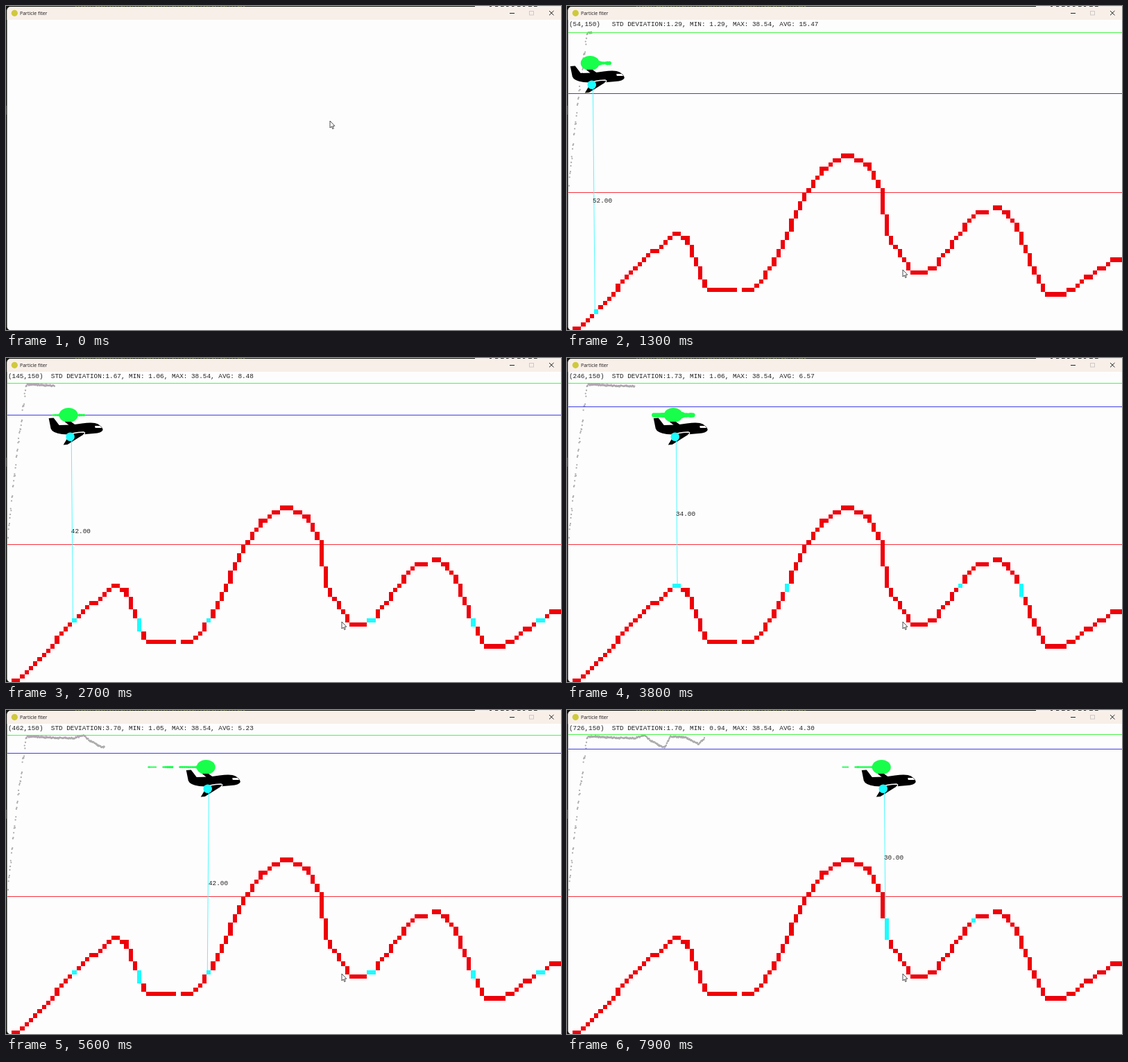
These frames come from a looping animation (800 px wide and 468 px high, 8 s). An HTML page with a canvas:

```html
<!DOCTYPE html>
<html lang="en">
<head>
<meta charset="utf-8">
<title>Particle fiter</title>
<style>
html, body { margin: 0; width: 100%; height: 100%; overflow: hidden; background: #111; }
canvas { display: block; width: 800px; height: 468px; }
</style>
</head>
<body>
<canvas id="stage" width="800" height="468"></canvas>
<script>
const ctx = document.getElementById('stage').getContext('2d');
const STEP = 100, STEPS = 80;
const LEFT = 2, TOP = 20, SCALE = 0.625, CELL = 6.25;
const MONO = '9.375px "Liberation Mono", "Courier New", monospace';
const CYAN = '#1cfcff', GREEN = '#17ff4a';

// corners of the ground profile: column, row
const profile = [[1, 71.4], [6, 67], [15, 57], [24, 49], [25, 49], [27, 50], [32, 62], [42, 62],
  [46, 57], [54, 40], [58, 34.4], [60, 32.8], [64, 31], [65, 31], [69, 33.2], [72, 39], [74, 50],
  [79, 57.8], [82, 57.8], [84, 56.8], [93, 44.7], [99, 43], [101, 44.4], [104, 49], [107, 57],
  [110, 63], [114, 63], [122.5, 57], [125, 55]];
const flight = [[0, 0], [13, 54], [27, 145], [38, 246], [56, 462], [68, 600], [79, 726]];
// deviation against plot x; its running mean gives the average
const deviation = [[1.5, 38.54], [16, 17.05], [29, 1.5], [36, 1.29], [70.4, 1.67], [97.5, 1.73],
  [111, 1.1], [120, 2.2], [138, 3.9], [141.8, 3.7], [149, 1.3], [171.3, 1.55], [190, 3.1], [198.3, 1.7]];
const lowest = [[13, 1.29], [27, 1.06], [56, 1.05], [68, 0.94]];
// step, left reach, right reach, tail half height
const swarm = [[13, 13, 31, 3.2], [27, 25, 27, 2], [38, 33, 32, 4.2],
  [56, 87, 4, 1.7], [68, 23, 23, 5.8], [79, 59, 4, 1.5]];

const hash = n => { const s = Math.sin(n * 12.9898 + 4.1) * 43758.5453; return s - Math.floor(s); };
const plotY = v => 30 + 6.22 * v;
const headX = k => 4 + 2.46 * k;

function segment(keys, t) {
  let i = 0;
  while (i < keys.length - 2 && t > keys[i + 1][0]) i++;
  return i;
}

function linear(keys, t, field = 1) {
  const i = segment(keys, t), a = keys[i], b = keys[i + 1];
  const u = Math.min(1, Math.max(0, (t - a[0]) / (b[0] - a[0])));
  return a[field] + (b[field] - a[field]) * u;
}

function smooth(keys, t) {
  const i = segment(keys, t), a = keys[i], b = keys[i + 1];
  const slope = j => {
    const p = keys[Math.max(0, j - 1)], q = keys[Math.min(keys.length - 1, j + 1)];
    return (q[1] - p[1]) / (q[0] - p[0]);
  };
  const w = b[0] - a[0], u = (t - a[0]) / w, u2 = u * u, u3 = u2 * u;
  return a[1] * (2 * u3 - 3 * u2 + 1) + b[1] * (3 * u2 - 2 * u3)
    + w * (slope(i) * (u3 - 2 * u2 + u) + slope(i + 1) * (u3 - u2));
}

function mean(keys, end) {
  const from = keys[0][0], n = 800, dx = (end - from) / n;
  let sum = 0;
  for (let i = 0; i < n; i++) sum += linear(keys, from + (i + 0.5) * dx);
  return sum / n;
}

const ground = Array.from({ length: 128 }, (_, c) => Math.round(linear(profile, c)));
const gaps = [0, 39, 97];

function rect(color, x, y, w, h) {
  ctx.fillStyle = color;
  ctx.fillRect(x, y, w, h);
}

function oval(color, x, y, rx, ry = rx) {
  ctx.fillStyle = color;
  ctx.beginPath();
  ctx.ellipse(x, y, rx, ry, 0, 0, Math.PI * 2);
  ctx.fill();
}

function poly(color, ...p) {
  ctx.fillStyle = color;
  ctx.beginPath();
  for (let i = 0; i < p.length; i += 2) ctx.lineTo(p[i], p[i + 1]);
  ctx.closePath();
  ctx.fill();
}

function line(color, width, ...p) {
  ctx.strokeStyle = color;
  ctx.lineWidth = width;
  ctx.beginPath();
  for (let i = 0; i < p.length; i += 4) {
    ctx.moveTo(p[i], p[i + 1]);
    ctx.lineTo(p[i + 2], p[i + 3]);
  }
  ctx.stroke();
}

function text(str, x, y, font, color) {
  ctx.font = font;
  ctx.fillStyle = color;
  ctx.fillText(str, x, y);
}

function panel(color, h, radii) {
  ctx.fillStyle = color;
  ctx.beginPath();
  ctx.roundRect(1.5, 1.2, 806, h, radii);
  ctx.fill();
}

function drawWindow() {
  rect('#12140f', 0, 0, 800, 468);
  for (let i = 0; i < 60; i++) rect('#4c5a30', 100 + i * 4.1, 0, 1 + 2 * hash(i), 1);
  rect('#e9e6e4', 676, 0, 124, 2);
  for (let i = 0; i < 9; i++) rect('#333', 697 + i * 8, 0, 3 + 2 * hash(i + 70), 1.3);
  rect('#444', 0, 144, 1, 13);
  panel('#fefdfe', 467, 5);
  panel('#f8efe9', 18.8, [5, 0, 0, 0]);
  oval('#cfc93c', 12.3, 10.3, 4.6);
  text('Particle fiter', 20, 13, '7px "Open Sans", "Noto Sans", sans-serif', '#1c1a19');
  line('#222', 1, 726, 10.5, 733, 10.5);
  ctx.strokeStyle = '#cfc8c4';
  ctx.strokeRect(754.5, 7.5, 6, 5.5);
  line('#222', 1, 783, 7, 789.5, 13.3, 789.5, 7, 783, 13.3);
}

function drawGround(level) {
  const px = c => Math.floor(LEFT + c * CELL);
  const py = r => Math.floor(TOP + r * CELL);
  ground.forEach((top, c) => {
    if (gaps.includes(c)) return;
    const end = Math.max(top + 1, ground[c - 1], ground[c + 1] || 0);
    rect(top === level ? CYAN : '#ee0009', px(c), py(top), px(c + 1) - px(c), py(end) - py(top));
  });
}

function drawPlot(k, min, avg) {
  const end = headX(k);
  for (let i = 0, x = 3; x <= end; i++, x = 3 + i * SCALE) {
    const spread = x < 28 ? 14 : 2.4;
    const y = plotY(linear(deviation, x)) + spread * (hash(i + 9) - 0.5);
    oval('#ababab', x, Math.min(268, y), 1.15);
  }
  const level = (color, v) => rect(color, LEFT, Math.round(plotY(v) - 0.5), 798, 1);
  level('#45f545', min);
  level('#f5323c', 38.54);
  level('#3d3de8', avg);
}

function drawSwarm(k, x, dev) {
  const y = 82.5, cx = x - 2.5;
  const h = linear(swarm, k, 3);
  // early on the particles still cover the whole width
  for (let i = 0; i < 128 && dev > 1.4 && k < 13; i++) {
    const px = LEFT + i * CELL;
    if (Math.abs(px - cx) < 21 * dev && hash(i + 40) < dev / 38 + 0.1)
      oval(GREEN, px, y, 3.2, 1.5 + 2.5 * hash(i + 80));
  }
  const tail = (dir, reach) => {
    for (let d = 4; d < reach - 2; d += 3) {
      const n = Math.floor(d / 8) + dir * 50 + Math.floor(k / 4) * 7;
      if (d > 30 && hash(n) < 0.2) continue;
      const r = h * (1.15 - 0.5 * d / reach) * (0.8 + 0.4 * hash(n + 3));
      oval(GREEN, cx + dir * d, y, Math.max(2.1, r), Math.max(1, r));
    }
  };
  tail(-1, linear(swarm, k, 1));
  tail(1, linear(swarm, k, 2));
  const grow = Math.min(1, 0.25 + k / 15);
  oval(GREEN, cx, y, 13.5 * grow, 10.5 * grow);
}

function drawPlane(x) {
  ctx.save();
  ctx.translate(x, 0);
  poly('#000', -8, 92, 1, 92, 8, 97, -2, 97);
  ctx.fillStyle = '#000';
  ctx.beginPath();
  ctx.moveTo(-31, 87);
  ctx.lineTo(-24, 86.5);
  ctx.quadraticCurveTo(-19, 93, -16, 97);
  ctx.quadraticCurveTo(4, 97, 17, 94.5);
  ctx.quadraticCurveTo(34, 92, 40, 95.5);
  ctx.quadraticCurveTo(47, 100, 47, 104);
  ctx.quadraticCurveTo(45, 108.5, 34, 109);
  ctx.quadraticCurveTo(10, 112, -12, 110);
  ctx.quadraticCurveTo(-26, 108, -28, 102);
  ctx.closePath();
  ctx.fill();
  poly('#fefdfe', 35.5, 98, 43, 98, 45.5, 101, 36, 101);
  poly('#000', 4, 109, 19, 108, 20, 110, -4, 125, -10, 125.5, -3, 114);
  ctx.strokeStyle = '#fefdfe';
  ctx.lineWidth = 1.3;
  ctx.beginPath();
  ctx.moveTo(-3, 112);
  ctx.quadraticCurveTo(3, 107.5, 19, 107);
  ctx.quadraticCurveTo(23, 107.5, 19, 111);
  ctx.stroke();
  ctx.restore();
}

function drawCursor(k) {
  const u = Math.min(1, k / 9), e = u * u * (3 - 2 * u);
  ctx.save();
  ctx.translate(467 + 17 * e, 166 + 215 * e);
  poly('#fff', 0, 0, 0, 10, 2.3, 8, 3.8, 11.5, 5.3, 10.8, 3.9, 7.5, 6.8, 7.2);
  ctx.strokeStyle = '#222';
  ctx.lineWidth = 0.8;
  ctx.stroke();
  ctx.restore();
}

function drawScene(k) {
  const pos = Math.round(smooth(flight, k));
  const x = LEFT + pos * SCALE;
  const col = Math.round(pos / 10 + 0.2);
  const level = ground[col];
  const dist = level - 15;
  const dev = linear(deviation, headX(k));
  const min = k < 13 ? dev : linear(lowest, k);
  const avg = mean(deviation, headX(k));

  drawPlot(k, min, avg);
  drawGround(level);
  drawSwarm(k, x, dev);
  drawPlane(x);
  line('#4dfbff', 1, x + 1.6, 117, LEFT + col * CELL + 0.8, TOP + level * CELL);
  oval(CYAN, x, 113.8, 6.3);
  text(dist.toFixed(2), x + 1.2, 121.8 + 3.125 * dist, MONO, '#222');
  text(`(${pos},150)`.padEnd(11) + `STD DEVIATION:${dev.toFixed(2)}, MIN: ${min.toFixed(2)}, MAX: 38.54, AVG: ${avg.toFixed(2)}`,
    3, 28.6, MONO, '#222');
}

function draw(now) {
  const k = Math.floor(now / STEP) % STEPS;
  drawWindow();
  if (k > 0) drawScene(k);
  drawCursor(k);
}

const start = performance.now();
function tick() {
  draw(performance.now() - start);
  requestAnimationFrame(tick);
}
tick();
</script>
</body>
</html>
```
